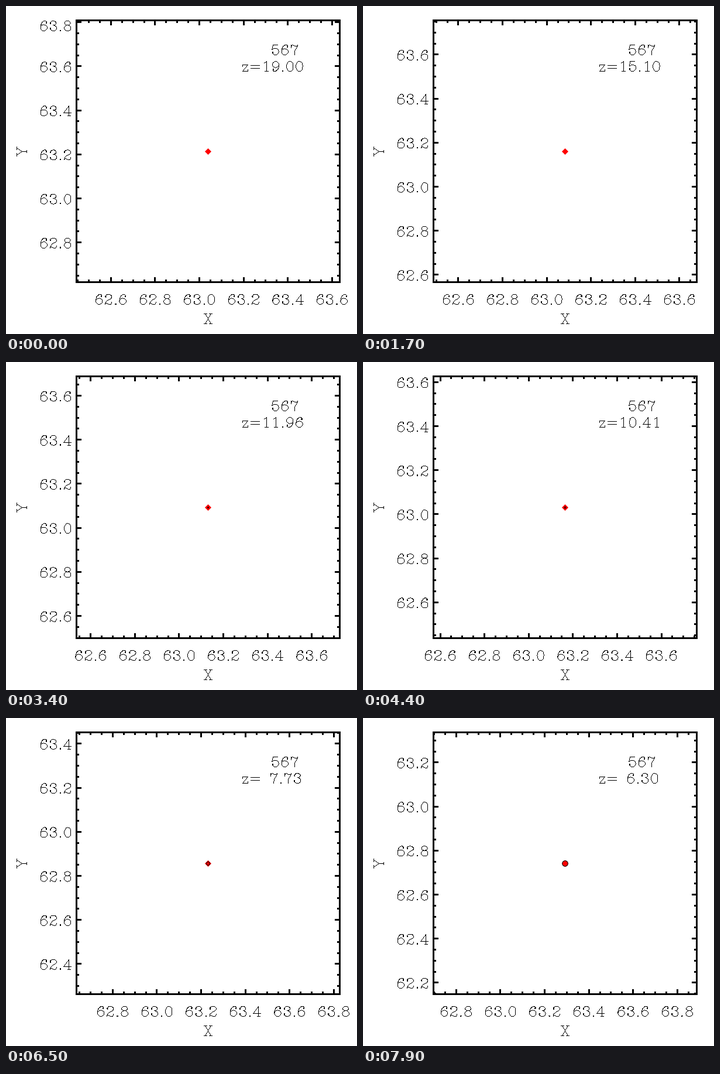
A matplotlib script for the animation above (8000 ms loop, 600 by 560 pixels).

```python
import numpy as np
import matplotlib.pyplot as plt
from matplotlib.animation import FuncAnimation
from matplotlib.patches import Circle, Polygon, Rectangle

W, H, DPI = 600, 560, 100
PX = 72 / DPI
FRAMES, STEP = 80, 100
LEFT, RIGHT, TOP, BOTTOM = 120.5, 570.5, 24.5, 471.5
MX, MY = 345.5, 248.5
SX, SY = 378.0, 376.0      # pixels per data unit
UNIT = 0.81                # pixels per glyph unit
GAP = np.array([[np.nan, np.nan]])


def track(n):
    """Position and redshift of the followed object at step n."""
    s = n / (FRAMES - 1)
    x = np.interp(n, [0, 10, 25, 34, 53, 65, 79],
                  [63.0395, 63.062, 63.107, 63.131, 63.195, 63.2316, 63.2925])
    y = 63.213 - s * (0.317 - 0.645 * s + 1.685 * s**2 - 0.885 * s**3)
    z = 20 * (7.3 / 20) ** s - 1
    return x, y, z


def arc(cx, cy, rx, ry, a=0, b=360):
    t = np.radians(np.linspace(a, b, 25))
    return np.column_stack([cx + rx * np.cos(t), cy + ry * np.sin(t)])


def line(*pts):
    return np.array(pts, float)


def bar(x, y, half=3):
    """Horizontal stroke or serif centred on x."""
    return line((x - half, y), (x + half, y))


def dot(x, y):
    return arc(x, y, 0.8, 0.8)


def make_glyphs():
    """Stroke glyphs on a 21 unit cap height."""
    bowl, cap = arc(10, 6, 7, 6), arc(10, 16.5, 6, 4.5)
    six = [arc(10, 6.5, 7, 6.5), arc(12, 7, 9, 14, 180, 90),
           arc(12, 17, 4, 4, 90, 0), dot(15, 17)]
    return {
        "0": [arc(10, 10.5, 7, 10.5)],
        "1": [line((6, 17), (11, 21), (11, 0)), bar(11, 0, 4)],
        "2": [dot(4, 16), arc(10, 16, 7, 5, 170, -45),
              line((15, 12.5), (8, 9), (4, 5), (3, 0)),
              line((3, 2), (5, 3), (11, 0), (15, 0), (17, 5))],
        "3": [dot(4, 16), arc(10, 16.5, 6, 4.5, 160, -90),
              arc(10, 6, 7, 6, 90, -160), dot(4, 5)],
        "4": [line((13, 0), (13, 21), (2, 6), (18, 6)), bar(13, 0)],
        "5": [line((15, 21), (5, 21), (3, 11)),
              arc(10, 7, 7, 7, 145, -160), dot(4, 5)],
        "6": six,
        "7": [line((3, 21), (3, 15)),
              line((3, 17), (6, 21), (12, 18), (15, 18), (17, 21)),
              line((17, 21), (17, 18), (11, 9), (10, 0))],
        "8": [cap, bowl],
        "9": [np.array([20, 21]) - s for s in six],
        ".": [dot(5, 1)],
        "=": [bar(13, 12, 9), bar(13, 6, 9)],
        " ": [],
        "z": [line((4, 10), (4, 14), (15, 14), (4, 0), (15, 0), (15, 4))],
        "X": [line((4, 21), (16, 0)), line((16, 21), (4, 0))]
             + [bar(x, y) for x in (4, 16) for y in (0, 21)],
        "Y": [line((4, 21), (11, 10), (11, 0)), line((18, 21), (11, 10)),
              bar(4, 21), bar(18, 21), bar(11, 0)],
    }


GLYPHS = make_glyphs()
ADVANCE = {".": 10, "=": 26, " ": 16, "z": 18, "Y": 22}


def advance(c):
    return ADVANCE.get(c, 20)


def stroke(mask, xs, ys):
    """One pixel wide polyline between whole pixels."""
    xs, ys = np.floor(xs).astype(int), np.floor(ys).astype(int)
    for x0, y0, x1, y1 in zip(xs, ys, xs[1:], ys[1:]):
        count = max(abs(x1 - x0), abs(y1 - y0)) + 1
        cols = np.floor(np.linspace(x0, x1, count) + 0.5).astype(int)
        rows = np.floor(np.linspace(y0, y1, count) + 0.5).astype(int)
        mask[rows, cols] = 255


def write(mask, text, x, y, align=0.0, upright=True):
    """Text whose baseline is anchored at (x, y)."""
    pen = -align * sum(map(advance, text))
    for c in text:
        for s in GLYPHS[c]:
            u, v = (s[:, 0] + pen) * UNIT, s[:, 1] * UNIT
            if upright:
                stroke(mask, x + u, y - v)
            else:
                stroke(mask, x - v, y - u)
        pen += advance(c)


def scale(center, origin, rate, low, high):
    """Visible steps of 0.05: pixel centre, exact pixel, label or None."""
    for k in range(int(center * 20) - 15, int(center * 20) + 16):
        p = origin + (k / 20 - center) * rate
        if low <= p <= high:
            yield np.floor(p) + 0.5, p, None if k % 4 else f"{k / 20:.1f}"


fig = plt.figure(figsize=(W / DPI, H / DPI), dpi=DPI, facecolor="white")
ax = fig.add_axes([0, 0, 1, 1])
rgba = np.zeros((H, W, 4), np.uint8)
ink = ax.imshow(rgba, extent=(0, W, H, 0), aspect="auto",
                interpolation="nearest", zorder=1)
ax.set(xlim=(0, W), ylim=(H, 0))
ax.axis("off")

ax.add_patch(Rectangle((LEFT, TOP), RIGHT - LEFT, BOTTOM - TOP, fill=False,
                       ec="black", lw=3 * PX, joinstyle="miter", snap=False))
ticks, = ax.plot([], [], color="black", lw=3 * PX, solid_capstyle="butt",
                 snap=False)
ax.add_patch(Polygon([(MX - 5.5, MY), (MX, MY - 5.5), (MX + 5.5, MY), (MX, MY + 5.5)],
                     fc="red", ec="none"))
halo = ax.add_patch(Circle((MX, MY), 1, fc="red", ec="black", lw=PX))

fixed = np.zeros((H, W), np.uint8)
write(fixed, "567", 452.5, 83.5)
write(fixed, "X", MX, 542.5, 0.5)
write(fixed, "Y", 35.5, MY, 0.5, upright=False)


def draw(n):
    cx, cy, z = track(n)
    mask = fixed.copy()
    write(mask, f"z={z:5.2f}", 401, 111.5)
    marks = []

    for x, p, label in scale(cx, MX, SX, LEFT, RIGHT):
        size = 8.5 if label else 4.5
        marks += [line((x, TOP), (x, TOP + size)), GAP,
                  line((x, BOTTOM), (x, BOTTOM - size)), GAP]
        if label:
            write(mask, label, p, 509.5, 0.5)

    for y, p, label in scale(cy, MY, -SY, TOP, BOTTOM):
        size = 8.5 if label else 4.5
        marks += [line((LEFT, y), (LEFT + size, y)), GAP,
                  line((RIGHT, y), (RIGHT - size, y)), GAP]
        if label:
            write(mask, label, 113.3, np.clip(p + 9.5, 42.5, 471.5), 1.0)

    ticks.set_data(*np.vstack(marks).T)
    rgba[..., 3] = mask
    ink.set_data(rgba)
    radius = 4.8 * np.exp(0.036 * (n - FRAMES + 1))
    halo.set_radius(radius)
    halo.set_visible(radius > 0.8)
    return ticks, ink, halo


anim = FuncAnimation(fig, draw, frames=FRAMES, interval=STEP, repeat=True,
                     repeat_delay=0, blit=False)
plt.show()
```
